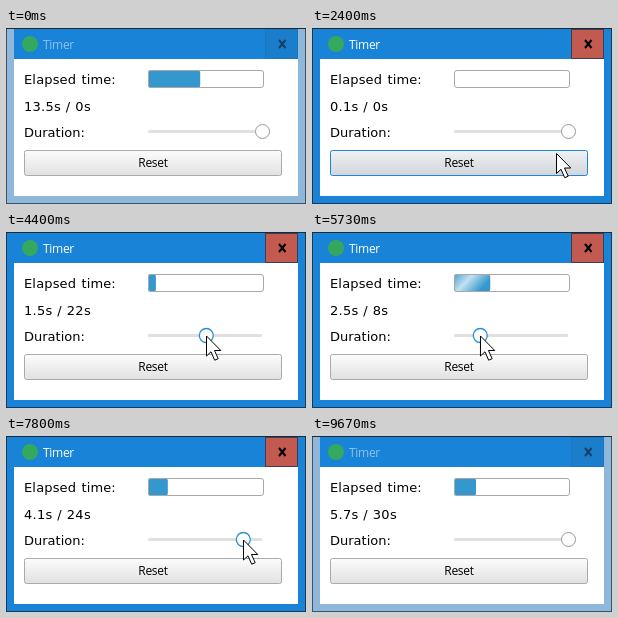
Animation, 300 px wide and 176 px high, one loop 9.74 s. Source, as an HTML page:

```html
<!DOCTYPE html>
<html lang="en">
<head>
<meta charset="utf-8">
<title>Timer</title>
<style>
  html, body { margin: 0; width: 100%; height: 100%; overflow: hidden; }
  svg { display: block; width: 300px; height: 176px; }
  text { white-space: pre; }
  .label { font: 13px "DejaVu Sans", sans-serif; }
  .ui { font: 12px "Open Sans", "Noto Sans", sans-serif; letter-spacing: -.3px; }
  .edge { fill: #3c5468; }
  .frame { fill: #8fb7da; }
  .caption { fill: #8fc3ee; }
  .close { fill: #1a7ecd; stroke: #1976c0; }
  .cross { stroke: #173f63; }
  .active .edge { fill: #173a58; }
  .active .frame { fill: #1883d7; }
  .active .caption { fill: #fff; }
  .active .close { fill: #c35a50; stroke: #3a3f55; }
  .active .cross { stroke: #000; }
  #button { fill: url(#face); stroke: #aaa; }
  #button.hover { fill: url(#faceHover); stroke: #1f87d9; }
  #thumb { stroke: #999; }
  #thumb.pressed { stroke: #2a8fd0; stroke-width: 1.3; }
</style>
</head>
<body>
<svg id="win" viewBox="0 0 300 176">
  <defs>
    <linearGradient id="face" x2="0" y2="1">
      <stop stop-color="#fcfcfc"/><stop offset="1" stop-color="#e1e1e1"/>
    </linearGradient>
    <linearGradient id="faceHover" x2="0" y2="1">
      <stop stop-color="#eff1f3"/><stop offset="1" stop-color="#d2d6da"/>
    </linearGradient>
    <linearGradient id="shine">
      <stop stop-color="#fff" stop-opacity="0"/>
      <stop offset=".5" stop-color="#fff" stop-opacity=".7"/>
      <stop offset="1" stop-color="#fff" stop-opacity="0"/>
    </linearGradient>
    <clipPath id="done"><rect id="clip" x="142" y="42" height="18" rx="3"/></clipPath>
  </defs>

  <rect class="edge" width="300" height="176"/>
  <rect width="300" height="1" fill="#1c2a36"/>
  <rect class="frame" x="1" y="1" width="298" height="174"/>
  <rect x="8" y="1" width="284" height="30" fill="#1883d7"/>
  <circle cx="24" cy="16" r="8" fill="#35a860"/>
  <text class="ui caption" x="37" y="20.5">Timer</text>
  <rect class="close" x="259.5" y="1.5" width="32" height="29"/>
  <path class="cross" d="M273 12l6.5 8m0-8l-6.5 8" stroke-width="2"/>
  <rect x="8" y="31" width="284" height="137" fill="#fff"/>

  <text class="label" x="18" y="56" letter-spacing=".15" word-spacing="1">Elapsed time:</text>
  <text class="label" id="time" x="18" y="83" letter-spacing=".25" word-spacing=".5"></text>
  <text class="label" x="18" y="109">Duration:</text>

  <rect x="142.5" y="42.5" width="115" height="17" rx="2.5" fill="#fff"/>
  <g clip-path="url(#done)">
    <rect x="142" y="42" width="116" height="18" fill="#3498cf"/>
    <rect id="sheen" x="-22" y="-10" width="44" height="20" fill="url(#shine)"/>
  </g>
  <rect x="142.5" y="42.5" width="115" height="17" rx="2.5" fill="none" stroke="#a8a8a8"/>

  <rect x="142" y="102" width="114" height="3" rx="1" fill="#e0e0e0"/>
  <circle id="thumb" cy="103.5" r="7" fill="#fff"/>

  <rect id="button" x="18.5" y="122.5" width="257" height="25" rx="2"/>
  <text class="ui" x="147" y="139" text-anchor="middle">Reset</text>

  <path id="cursor" d="M.5 .5V20.5L5 16.3L8.7 24.7L12.2 23.2L8.5 15H14.8Z" fill="#fff" stroke="#000"/>
</svg>
<script>
  const LOOP = 9740, FPS = 15, MAX = 30;
  const LEFT = 142, RIGHT = 256.5, BAR = 116;
  const PRESS = 3440, RELEASE = 8380, RESET = 2280, LAG = 130;
  const $ = id => document.getElementById(id);
  const mix = (a, b, p) => a + (b - a) * p;
  const part = (t, from, to) => Math.min(1, Math.max(0, (t - from) / (to - from)));

  // pointer moves: start, end, target x and y, easing power
  const moves = [
    [0, 1070, 258, 104, .8],
    [1500, 2150, 244, 125, 1],
    [2500, 3300, 256, 103.5, 1],
    [3470, 4400, 200, 103.5, 4],
    [4660, 6000, 160, 103.5, 1],
    [6000, 8300, 256, 103.5, .9],
    [8500, 9340, 236, 178, 1.5]
  ];

  // the clock ticks slower while the slider is dragged
  const clock = [[RESET, 0], [3400, 1], [4400, 1.55], [7800, 4.15], [9670, 5.75]];

  function pointer(t) {
    let x = 298, y = 176;
    for (const [from, to, tx, ty, power] of moves) {
      const p = part(t, from, to) ** power;
      x = mix(x, tx, p);
      y = mix(y, ty, p);
    }
    return { x, y };
  }

  function elapsed(t) {
    if (t < RESET) return 13.52 + t * .0009;
    return clock.slice(1).reduce((s, [end, value], i) =>
      mix(s, value, part(t, clock[i][0], end)), 0);
  }

  function thumbX(t) {
    return t < PRESS || t > 8300 ? RIGHT : Math.min(RIGHT, pointer(t).x + .3);
  }

  function duration(t) {
    if (t < PRESS + LAG) return 0;
    return Math.round(part(thumbX(t - LAG), LEFT, RIGHT) * MAX);
  }

  function draw(t) {
    const { x, y } = pointer(t);
    const secs = Math.floor(elapsed(t) * 10) / 10;
    const total = duration(t);
    const width = Math.min(1, secs / (total || MAX)) * BAR;

    $("win").classList.toggle("active", t > 1460 && t < 9460);
    $("time").textContent = `${secs}s / ${total}s`;

    $("clip").setAttribute("width", width > 1 ? width : 0);
    const sweep = mix(100, 200, part(t, 5310, 6110));
    $("sheen").setAttribute("transform", `translate(${sweep} 51) skewX(-42)`);

    $("thumb").setAttribute("cx", thumbX(t));
    $("thumb").classList.toggle("pressed", t > PRESS && t < RELEASE);
    $("button").classList.toggle("hover", x > 18 && x < 276 && y > 122 && y < 148);

    $("cursor").setAttribute("transform", `translate(${x} ${y})`);
    $("cursor").setAttribute("visibility", t > 60 && t < 9340 ? "visible" : "hidden");
  }

  const start = performance.now();
  function tick() {
    const t = (performance.now() - start) % LOOP;
    draw(Math.floor((t + 5) * FPS / 1000) * 1000 / FPS);
    requestAnimationFrame(tick);
  }
  tick();
</script>
</body>
</html>
```
